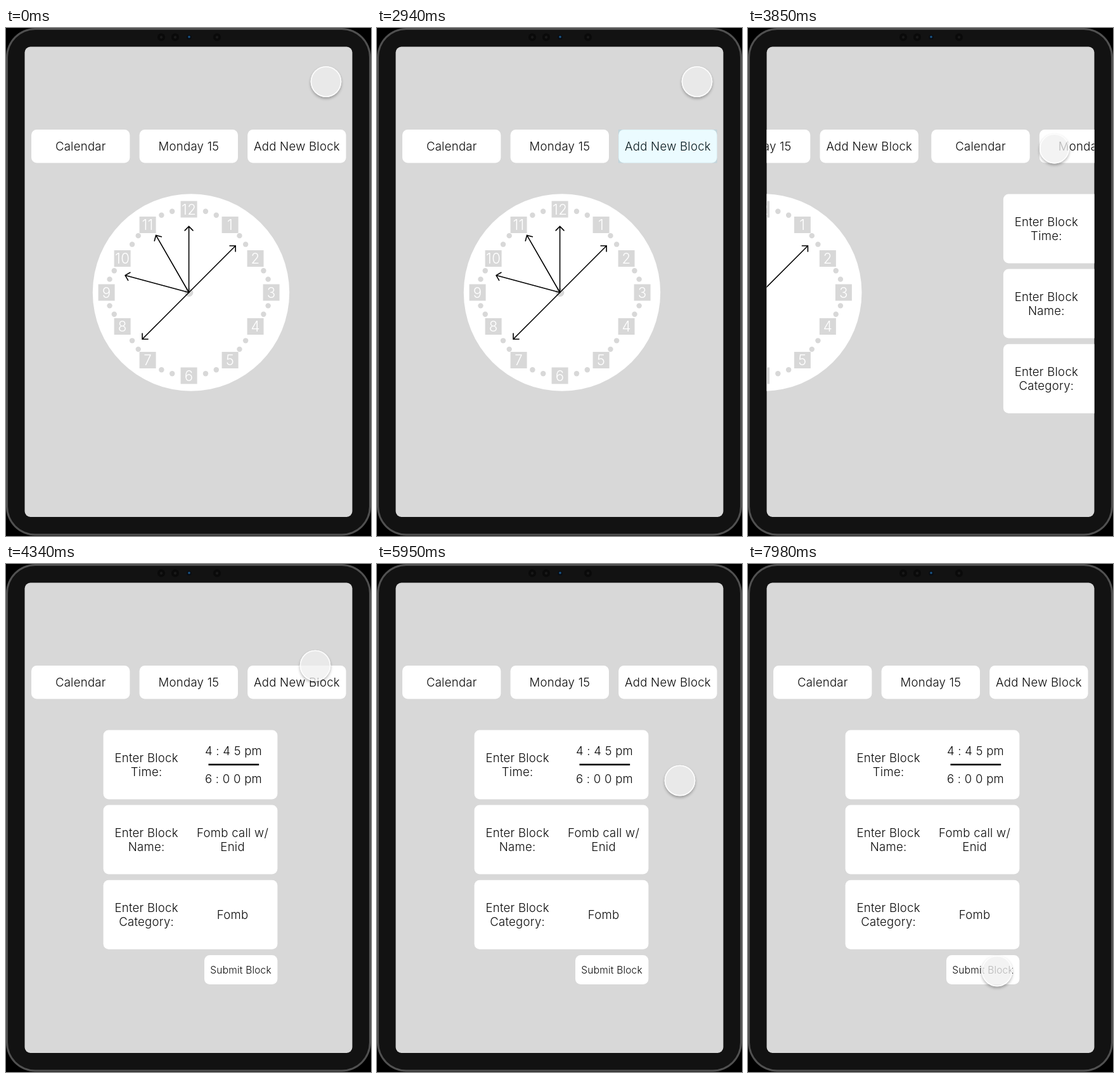
Write an HTML page with a canvas that moves like this. It is 576x800 px and loops after 8000 ms.

```html
<!DOCTYPE html>
<html lang="en">
<head>
<meta charset="utf-8">
<title>Day planner</title>
<style>
html, body { margin: 0; width: 100%; height: 100%; overflow: hidden; background: #000; }
canvas { display: block; width: 576px; height: 800px; }
</style>
</head>
<body>
<canvas id="stage"></canvas>
<script>
const W = 576, H = 800, LOOP = 8000;
const GREY = '#d8d8d8', INK = '#0a0a0a';
const PAGE = { x: 29.5, y: 29.5, w: 517, h: 740.5 };
const DIAL = { x: 288.6, y: 416.5 };
const SLIDE = { start: 3744, length: 300 };
const FLASH = 700;

const canvas = document.getElementById('stage');
const ratio = window.devicePixelRatio || 1;
canvas.width = W * ratio;
canvas.height = H * ratio;
const ctx = canvas.getContext('2d');

// time, x, y where the touch pointer turns
const STOPS = [
  [3010, 505, 84.5], [3350, 484, 190], [3900, 483.5, 190], [4340, 488, 160],
  [5950, 478, 341], [6650, 473, 541], [7200, 473, 541], [7940, 393, 641]
];

const clamp = v => Math.max(0, Math.min(1, v));
const smooth = v => v * v * (3 - 2 * v);
const rad = deg => deg * Math.PI / 180;

// cubic bezier (0, 0, .58, 1)
function easeOut(p) {
  let lo = 0, hi = 1;
  for (let i = 0; i < 24; i++) {
    const s = (lo + hi) / 2;
    const x = 1.74 * s * s * (1 - s) + s * s * s;
    if (x < p) lo = s; else hi = s;
  }
  return 3 * lo * lo * (1 - lo) + lo * lo * lo;
}

function box(x, y, w, h, r, fill) {
  ctx.beginPath();
  ctx.roundRect(x, y, w, h, r);
  ctx.fillStyle = fill;
  ctx.fill();
}

function disc(x, y, r, fill) {
  ctx.beginPath();
  ctx.arc(x, y, r, 0, Math.PI * 2);
  ctx.fillStyle = fill;
  ctx.fill();
}

function label(str, x, y, size = 18.6, fill = INK) {
  ctx.font = `300 ${size}px Inter, Roboto, sans-serif`;
  ctx.letterSpacing = size * 0.013 + 'px';
  ctx.textAlign = 'center';
  ctx.textBaseline = 'alphabetic';
  ctx.fillStyle = fill;
  ctx.fillText(str, x, y);
}

function arrow(deg) {
  const len = 104, arm = 6.4;
  ctx.save();
  ctx.translate(DIAL.x, DIAL.y);
  ctx.rotate(rad(deg));
  ctx.beginPath();
  ctx.moveTo(0, 0);
  ctx.lineTo(0, -len);
  ctx.moveTo(-arm, arm - len);
  ctx.lineTo(0, -len);
  ctx.lineTo(arm, arm - len);
  ctx.strokeStyle = '#000';
  ctx.lineWidth = 1.6;
  ctx.lineCap = 'round';
  ctx.stroke();
  ctx.restore();
}

function flash(t, starts, x, y, w, h) {
  for (const s of starts) {
    const u = (t - s) / FLASH;
    if (u <= 0 || u >= 1) continue;
    const k = clamp(u / 0.1) * clamp((1 - u) / 0.5);
    ctx.fillStyle = `rgba(0,200,255,${0.4 * k})`;
    ctx.fillRect(x, y, w, h);
    ctx.strokeStyle = `rgba(0,180,240,${0.25 * k})`;
    ctx.lineWidth = 1;
    ctx.strokeRect(x + 0.5, y + 0.5, w - 1, h - 1);
  }
}

function tabs() {
  ['Calendar', 'Monday 15', 'Add New Block'].forEach((name, i) => {
    const x = 40 + i * 170.6;
    box(x, 160, 155.4, 52.5, 8.5, '#fff');
    label(name, x + 77.8, 193.2);
  });
}

// the dial markers lie on a slightly squared ring
function ring(deg) {
  const a = rad(deg);
  return [
    125.6 * Math.sin(a) + 4.4 * Math.sin(5 * a),
    -123 * Math.cos(a) - 8 * Math.cos(3 * a)
  ];
}

function clock() {
  disc(292, 416.5, 155.2, '#fff');

  for (let n = 1; n <= 12; n++) {
    const [dx, dy] = ring(n * 30);
    const x = DIAL.x + dx, y = DIAL.y + dy;
    ctx.fillStyle = GREY;
    ctx.fillRect(x - 13, y - 13, 26, 26);
    label(n, x, y + 8.1, 22.3, '#fff');
  }

  for (let n = 0; n < 3; n++) {
    for (const step of [10.5, 18]) {
      const [dx, dy] = ring(n * 30 + step);
      for (const sx of [-1, 1])
        for (const sy of [-1, 1])
          disc(DIAL.x + sx * dx, DIAL.y + sy * dy, 4.2, GREY);
    }
  }

  disc(DIAL.x, DIAL.y, 6.8, GREY);
  [0, 45, 225, 285, 330].forEach(arrow);
}

function homePage(t) {
  tabs();
  clock();
  flash(t, [20, 1740, 2310], 381, 160, 155.5, 52.5);
}

function formPage(t) {
  tabs();
  ['Time:', 'Name:', 'Category:'].forEach((name, i) => {
    const y = 261.5 + i * 118.1;
    box(153.6, y, 274.8, 109, 8.5, '#fff');
    label('Enter Block', 221.6, y + 50);
    label(name, 221.6, y + 72.4);
  });
  label('4 : 4 5 pm', 359, 300.5);
  label('6 : 0 0 pm', 359, 345.2);
  ctx.fillStyle = '#000';
  ctx.fillRect(319.5, 314.6, 79.7, 2.6);
  label('Fomb call w/', 357.6, 429.5);
  label('Enid', 357.6, 452);
  label('Fomb', 357.6, 559.2);
  box(313, 616, 115.4, 46, 8.5, '#fff');
  label('Submit Block', 370.6, 644.6, 15.5);
  flash(t, [6500], 313, 616, 115.4, 46);
}

function device() {
  ctx.fillStyle = '#000';
  ctx.fillRect(0, 0, W, H);
  box(0, 0, 576, 799.5, 46, '#505050');
  box(3, 3, 570, 793.5, 43, '#121212');
  for (const x of [245, 267, 333]) {
    disc(x, 14.5, 6, '#0a0a0a');
    disc(x, 14.5, 2.2, '#191919');
  }
  disc(289, 14.5, 3.6, '#080d14');
  disc(289, 14, 1.8, '#1a5688');
}

function pointerAt(t) {
  const next = STOPS.findIndex(s => s[0] > t);
  if (next === 0) return STOPS[0].slice(1);
  if (next < 0) return STOPS[STOPS.length - 1].slice(1);
  const [t0, x0, y0] = STOPS[next - 1], [t1, x1, y1] = STOPS[next];
  const k = smooth((t - t0) / (t1 - t0));
  return [x0 + (x1 - x0) * k, y0 + (y1 - y0) * k];
}

function pointer(t) {
  const [x, y] = pointerAt(t);
  const r = t >= 3640 && t < 3920 ? 23.5 : 24.3;

  // the shadow shows only outside the translucent disc
  ctx.save();
  ctx.beginPath();
  ctx.rect(0, 0, W, H);
  ctx.arc(x, y, r, 0, Math.PI * 2);
  ctx.clip('evenodd');
  ctx.shadowColor = 'rgba(0,0,0,.3)';
  ctx.shadowBlur = 4 * ratio;
  ctx.shadowOffsetY = 2.5 * ratio;
  disc(x, y, r, '#fff');
  ctx.restore();

  disc(x, y, r, 'rgba(240,240,240,.76)');
  ctx.beginPath();
  ctx.arc(x, y, r - 0.8, 0, Math.PI * 2);
  ctx.strokeStyle = 'rgba(255,255,255,.85)';
  ctx.lineWidth = 1.6;
  ctx.stroke();
}

function draw(t) {
  ctx.setTransform(ratio, 0, 0, ratio, 0, 0);
  device();
  box(PAGE.x, PAGE.y, PAGE.w, PAGE.h, 9, GREY);

  const u = clamp((t - SLIDE.start) / SLIDE.length);
  const shift = u < 1 ? PAGE.w * easeOut(u) : PAGE.w;
  ctx.save();
  ctx.beginPath();
  ctx.roundRect(PAGE.x, PAGE.y, PAGE.w, PAGE.h, 9);
  ctx.clip();
  ctx.translate(-shift, 0);
  if (u < 1) homePage(t);
  ctx.translate(PAGE.w, 0);
  if (u > 0) formPage(t);
  ctx.restore();

  pointer(t);
}

const begin = performance.now();
function tick() {
  draw((performance.now() - begin) % LOOP);
  requestAnimationFrame(tick);
}
tick();
</script>
</body>
</html>
```
